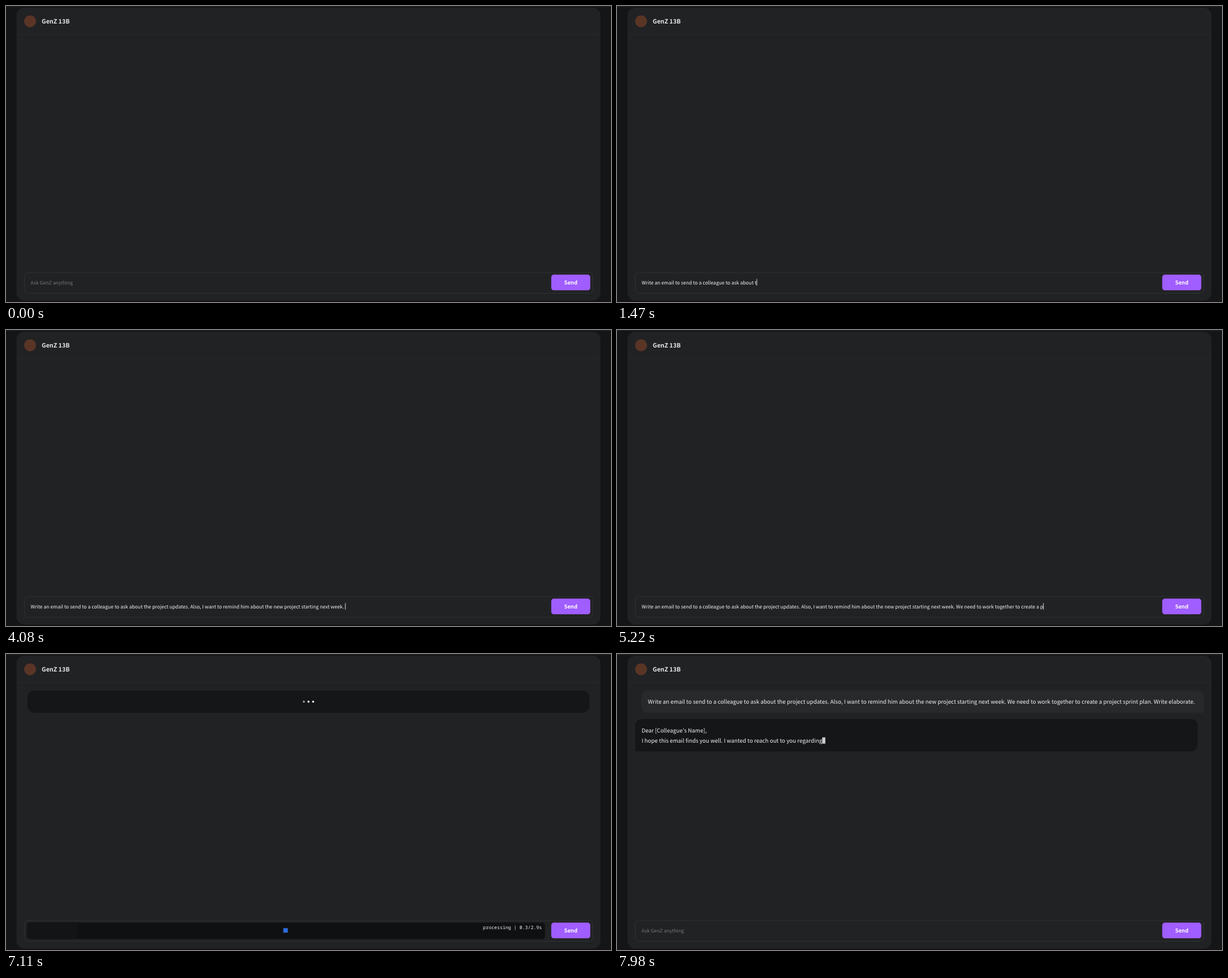
These frames come from a looping animation (1068x524 px, 8000 ms). An HTML page with a canvas:

```html
<!DOCTYPE html>
<html lang="en">
<head>
<meta charset="utf-8">
<title>Chat</title>
<style>
html, body { margin: 0; width: 100%; height: 100%; overflow: hidden; background: #141517; }
canvas { display: block; width: 1068px; height: 524px; }
</style>
</head>
<body>
<canvas id="stage" width="1068" height="524"></canvas>
<script>
const ctx = document.getElementById('stage').getContext('2d');
const LOOP = 8000;
const SANS = '"Noto Sans CJK JP", "Noto Sans CJK SC", "Noto Sans CJK", "Open Sans", sans-serif';
const MONO = '"Noto Sans Mono", "DejaVu Sans Mono", monospace';
const SMALL = 8.585, BODY = 9.811;
const INK = '#f6f6f7';

// typed text, start ms, end ms
const TYPING = [
  ['Write an email to send to a colleague to ask about t', 300, 1462],
  ['he project updates. Also, I want to remind him about the', 1470, 2722],
  [' new project starting next week. ', 2740, 3470],
  ['We need to work together to create a p', 4365, 5212],
  ['roject sprint plan. Write elaborate.', 5225, 6010]
];
const PROMPT = TYPING.map(p => p[0]).join('');
const REPLY = "Dear [Colleague's Name],\nI hope this email finds you well. " +
  'I wanted to reach out to you regarding';
const WORDS = REPLY.split(/(?=[ \n])/);

const WAIT = 7040, ANSWER = 7280, WORD_MS = 36;
const SPEED = 4, ETA = 2.9, BLINK = 132.5;

// Text is laid out at ten times its size so that advances stay fractional.
function setFont(size, weight, family) {
  ctx.font = `${weight} ${size * 10}px ${family}`;
}

function text(str, x, y, size, color, { weight = 400, family = SANS, align = 'left' } = {}) {
  ctx.save();
  ctx.translate(x, y);
  ctx.scale(0.1, 0.1);
  setFont(size, weight, family);
  ctx.textRendering = 'geometricPrecision';
  ctx.textAlign = align;
  ctx.fillStyle = color;
  ctx.fillText(str, 0, 0);
  ctx.restore();
}

function widthOf(str, size) {
  ctx.save();
  setFont(size, 400, SANS);
  ctx.textRendering = 'geometricPrecision';
  const w = ctx.measureText(str).width / 10;
  ctx.restore();
  return w;
}

function box(x, y, w, h, r, fill, stroke) {
  ctx.beginPath();
  ctx.roundRect(x, y, w, h, r);
  if (fill) { ctx.fillStyle = fill; ctx.fill(); }
  if (stroke) { ctx.strokeStyle = stroke; ctx.lineWidth = 1; ctx.stroke(); }
}

function rect(x, y, w, h, fill) {
  ctx.fillStyle = fill;
  ctx.fillRect(x, y, w, h);
}

function disc(x, y, r, fill) {
  ctx.beginPath();
  ctx.arc(x, y, r, 0, 7);
  ctx.fillStyle = fill;
  ctx.fill();
}

function drawShell() {
  rect(0, 0, 1068, 524, '#141517');
  rect(0, 0, 1068, 1, '#29292b');
  box(18.5, 3, 1031, 518.5, 14, '#212224');
  rect(0, 523, 1068, 1, '#170d10');
  rect(19, 50, 1030, 1, '#28292b');
  disc(42.5, 27, 10.5, '#5a3526');
  text('GenZ 13B', 63, 31, 10.65, '#e8e8e9', { weight: 700 });
  box(32.5, 472, 1003, 36.5, 6, null, '#303134');
  box(962.5, 475.6, 68.9, 27.7, 4.5, '#a05dff');
  text('Send', 997, 493, 9.45, '#ffffff', { weight: 700, align: 'center' });
}

function drawInput(t) {
  let typed = '', lastKey = 0;
  if (t < WAIT) {
    for (const [part, from, to] of TYPING) {
      if (t < from) break;
      const k = Math.min(1, (t - from) / (to - from));
      typed += part.slice(0, Math.floor(k * part.length));
      lastKey = Math.min(t, to);
    }
  }
  if (!typed) {
    text('Ask GenZ anything', 43.5, 492.6, SMALL, '#77787c');
    return;
  }
  text(typed, 43.5, 492.6, SMALL, INK);
  if (Math.floor((t - lastKey) / BLINK) % 2 === 0) {
    rect(43.5 + widthOf(typed, SMALL), 483.5, 0.9, 11.5, INK);
  }
}

function drawWaiting(t) {
  const sec = (t - WAIT) / 1000 * SPEED;
  box(38, 64.7, 992, 39.3, 12, '#151618');
  for (let i = 0; i < 3; i++) {
    const e = sec - i / 3;
    const phase = ((e % 1) + 1) % 1;
    ctx.globalAlpha = e < 0 ? 1 : 0.8 - 0.3 * (1 - Math.abs(1 - 2 * phase));
    disc(525.8 + i * 8.2, 84.4, 1.8, '#f0f0f1');
  }
  ctx.globalAlpha = 1;

  box(37, 475.5, 914.5, 29, 5, '#0f1012');
  box(37, 475.5, Math.max(1, 914.5 * sec / ETA), 29, 5, '#131416');
  rect(489.5, 485.3, 8, 8, '#2f6bdc');
  text(`processing | ${sec.toFixed(1)}/${ETA}s`, 946, 487.2, 8.25, INK,
    { family: MONO, align: 'right' });
}

function drawAnswer(t) {
  box(43, 64.7, 993, 39.3, [12, 12, 0, 12], '#28292b');
  text(PROMPT, 54.5, 88, BODY, INK);

  const count = 1 + Math.floor((t - ANSWER) / WORD_MS);
  const lines = WORDS.slice(0, count).join('').split('\n');
  box(32, 115, 993, 39.5 + 18 * (lines.length - 1), [12, 12, 12, 0], '#151618');
  lines.forEach((line, i) => text(line, 43.5, 139 + i * 17.8, BODY, INK));
  const n = lines.length - 1;
  rect(43.5 + widthOf(lines[n], BODY), 129.8 + n * 17.8, 5.5, 11, '#cfcfd1');
}

function draw(t) {
  drawShell();
  if (t >= WAIT && t < ANSWER) {
    drawWaiting(t);
    return;
  }
  drawInput(t);
  if (t >= ANSWER) drawAnswer(t);
}

const start = performance.now();
function tick() {
  draw((performance.now() - start) % LOOP);
  requestAnimationFrame(tick);
}
tick();
</script>
</body>
</html>
```
